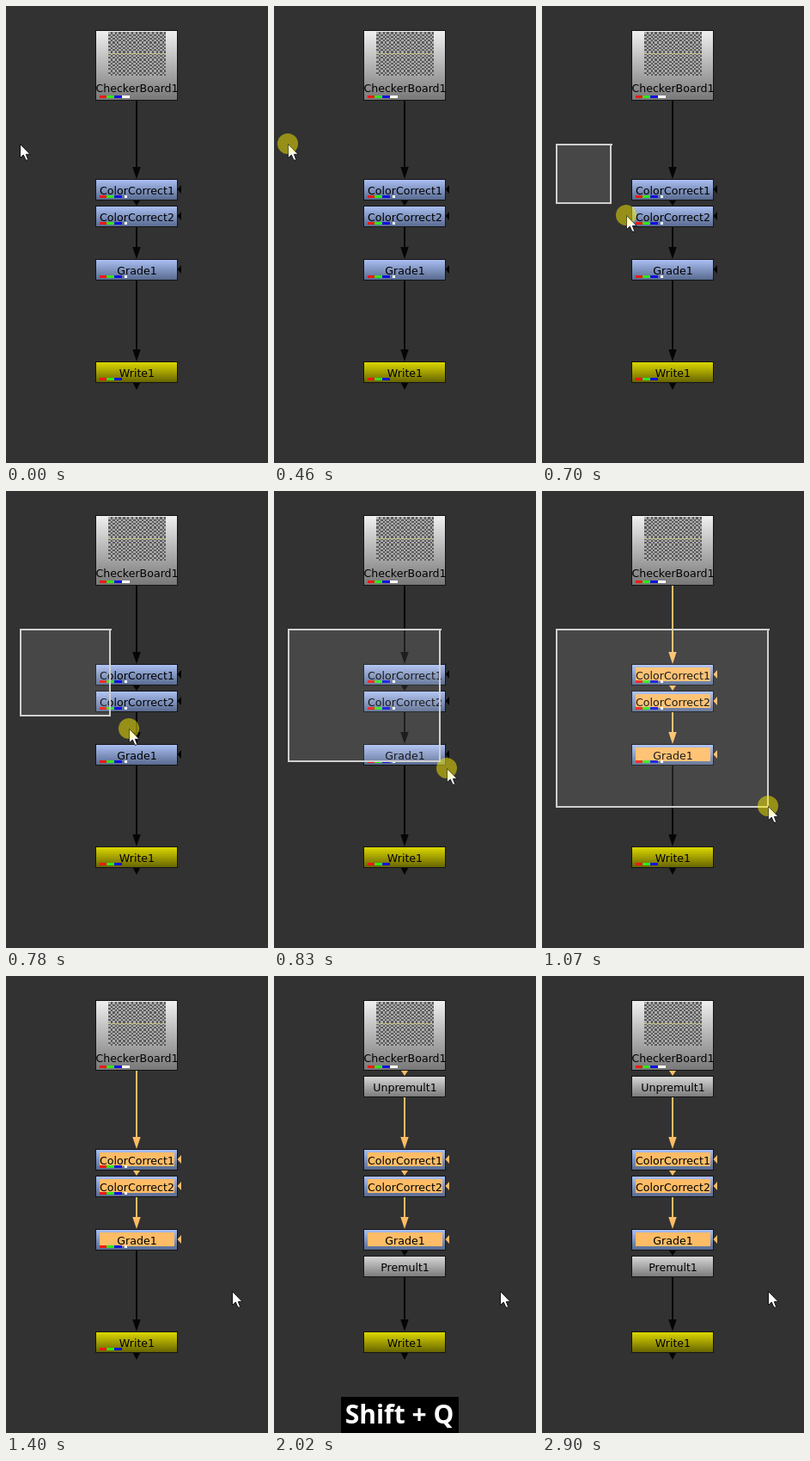
An HTML page with a canvas that plays this animation: 305x531 px, repeating every 3.36 s.

```html
<!DOCTYPE html>
<html lang="en">
<head>
<meta charset="utf-8">
<title>Node graph</title>
<style>
  html, body { margin: 0; width: 100%; height: 100%; overflow: hidden; background: #323232; }
  canvas { display: block; }
</style>
</head>
<body>
<canvas id="stage" width="305" height="531"></canvas>
<script>
const ctx = document.getElementById('stage').getContext('2d');
const LOOP = 3360, MID = 152;
const ORANGE = '#ffbc66', BLACK = '#050505';
const BLUE = ['#aabff2', '#596b90'], GREY = ['#d6d6d6', '#7c7c7c'], YELLOW = ['#dcd800', '#686500'];
const DRAG_START = 460, DRAG_END = 1400, KEYS_ON = 2020, KEYS_OFF = 2900;
const LAG = 25; // the selection box trails the pointer

// The drag advances in discrete steps along a keyed path: [ms, x, y]
const steps = [460, 560, 610, 650, 700, 750, 790, 830, 880, 930, 980, 1020, 1070];
const path = [[460, 16, 160], [580, 34, 182], [675, 80, 228], [700, 98, 243],
  [805, 193, 313], [830, 201, 322], [980, 256, 362], [1040, 263, 366]];

// Fine checkerboard whose cells do not line up with the pixel grid
const thumb = { x: 119, y: 30, w: 67, h: 51 };
const darkCells = new Path2D();
for (let j = 0; j < thumb.h; j++)
  for (let i = 0; i < thumb.w; i++)
    if ((Math.floor(i / 2.4) + Math.floor(j / 2.2)) % 2) darkCells.rect(thumb.x + i, thumb.y + j, 1, 1);

function pointerAt(t) {
  if (t <= path[0][0]) return path[0].slice(1);
  const i = path.findIndex(p => p[0] > t);
  if (i < 0) return path[path.length - 1].slice(1);
  const [t0, x0, y0] = path[i - 1], [t1, x1, y1] = path[i];
  const k = (t - t0) / (t1 - t0);
  return [Math.round(x0 + (x1 - x0) * k), Math.round(y0 + (y1 - y0) * k)];
}

function rect(x, y, w, h, color) {
  ctx.fillStyle = color;
  ctx.fillRect(x, y, w, h);
}

function poly(color, ...points) {
  ctx.beginPath();
  points.forEach(([x, y]) => ctx.lineTo(x, y));
  ctx.closePath();
  ctx.fillStyle = color;
  ctx.fill();
}

function wire(from, to, color) {
  const head = Math.max(from, to - 14);
  rect(MID - 1, from, 2, head - from, color);
  poly(color, [MID - 4.7, head], [MID + 4.7, head], [MID, to]);
}

function bars(y, white) {
  ['#f01818', '#30e818', '#1010e0'].forEach((c, i) => rect(109 + i * 9 - (i > 0), y, 9, 3, c));
  if (white) rect(white === 3 ? 138 : 135, y, white, 3, '#fff');
}

function thumbnail() {
  const { x, y, w, h } = thumb;
  rect(x, y, w, h, '#acacac');
  ctx.fillStyle = '#5c5c5c';
  ctx.fill(darkCells);
  rect(x, y + 25, w, 1, '#c2be84');
}

function node(label, y, [top, bottom], { h = 23, selected, white, channels, mask, image } = {}) {
  const shade = ctx.createLinearGradient(0, y, 0, y + h);
  shade.addColorStop(0, top);
  shade.addColorStop(1, bottom);
  rect(104, y - 1, 96, h + 2, '#151515');
  rect(105, y, 94, h, shade);
  if (selected) rect(109, y + 3, 87, 16, ORANGE);
  if (mask) {
    const c = y + 11;
    poly(selected ? ORANGE : BLACK, [199.5, c], [204, c - 5], [204, c + 5]);
  }
  if (image) thumbnail();
  if (channels) bars(y + h - 5, white);
  ctx.font = '12.6px "DejaVu Sans", sans-serif';
  ctx.textAlign = 'center';
  ctx.fillStyle = '#000';
  ctx.fillText(label, 152.5, y + h - (image ? 9 : 6));
}

function cursor(x, y) {
  const shape = new Path2D('M.5 .5V16.5L4.3 13L7 19H8.5L9.6 18.2L7.3 12.3H12Z');
  ctx.save();
  ctx.translate(x, y);
  ctx.fillStyle = '#fff';
  ctx.fill(shape);
  ctx.lineWidth = 1;
  ctx.strokeStyle = '#111';
  ctx.stroke(shape);
  ctx.restore();
}

function selectionBox(x, y) {
  if (x <= 18) return;
  rect(17, 161, x - 17, y - 161, 'rgba(255,255,255,.1)');
  const line = '#cfcfcf';
  rect(16, 160, x - 14, 2, line);
  rect(16, 160, 2, y - 159, line);
  rect(x - 1, 160, 2, y - 159, line);
  rect(16, y - 1, x - 15, 2, line);
}

function draw(t) {
  const step = steps.filter(s => s <= t).pop() || 0;
  const [px, py] = pointerAt(step);
  const [bx, by] = pointerAt(step - LAG);
  const selected = bx > 200 && by > 318;
  const dragging = t >= DRAG_START && t < DRAG_END;
  const wrapped = t >= KEYS_ON;
  const channels = !wrapped;
  const link = selected ? ORANGE : BLACK;
  const effect = { selected, channels, white: 3, mask: true };

  rect(0, 0, 305, 531, '#323232');
  if (wrapped) {
    wire(109, 116, link);
    wire(140, 201, link);
    wire(318, 325, BLACK);
    wire(349, 413, BLACK);
  } else {
    wire(109, 201, link);
    wire(318, 413, BLACK);
  }
  wire(225, 232, link);
  wire(256, 294, link);
  wire(437, 446, BLACK);

  node('CheckerBoard1', 29, ['#f0f0f0', '#787878'], { h: 80, channels: true, white: 9, image: true });
  node('ColorCorrect1', 202, BLUE, effect);
  node('ColorCorrect2', 233, BLUE, effect);
  node('Grade1', 295, BLUE, effect);
  node('Write1', 414, YELLOW, { channels });
  if (wrapped) {
    node('Unpremult1', 117, GREY);
    node('Premult1', 326, GREY);
  }

  if (dragging) selectionBox(bx, by + 1);
  cursor(px, py);
  if (dragging) {
    ctx.beginPath();
    ctx.arc(px, py, 12, 0, Math.PI * 2);
    ctx.fillStyle = 'rgba(250,238,0,.5)';
    ctx.fill();
    // The pointer stays pale inside the click highlight
    ctx.globalAlpha = 0.5;
    cursor(px, py);
    ctx.globalAlpha = 1;
  }

  if (wrapped && t < KEYS_OFF) {
    rect(78, 489, 137, 42, '#000');
    ctx.font = 'bold 30px "Open Sans", sans-serif';
    ctx.fillStyle = '#fff';
    ctx.fillText('Shift + Q', 146, 520);
  }
}

const start = performance.now();
function tick() {
  draw((performance.now() - start) % LOOP);
  requestAnimationFrame(tick);
}
tick();
</script>
</body>
</html>
```
